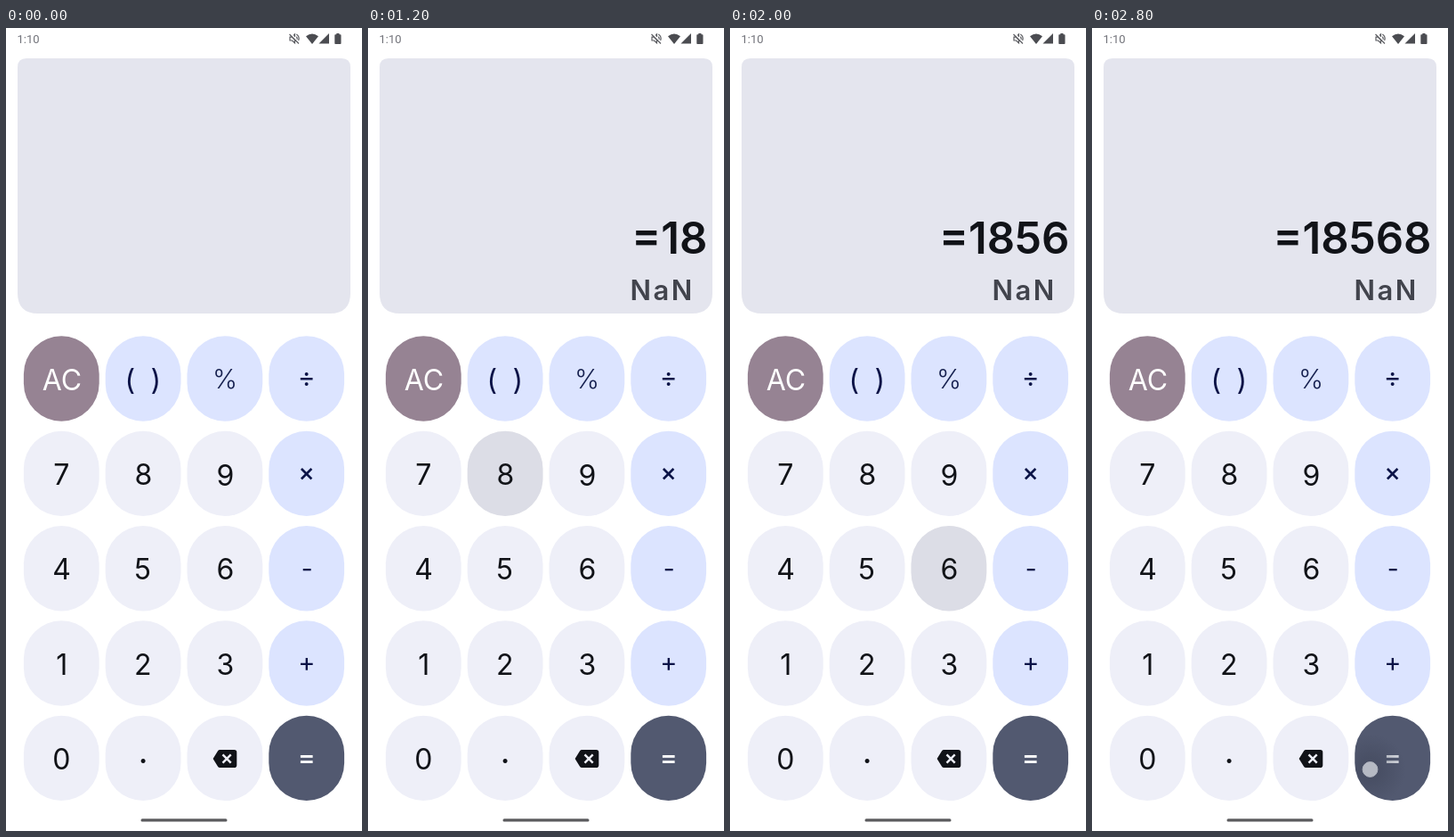
An HTML page for the animation above (3 s loop, 400 by 900 pixels).

```html
<!DOCTYPE html>
<html lang="en">
<head>
<meta charset="utf-8">
<title>Calculator</title>
<style>
  html, body { margin: 0; width: 100%; height: 100%; overflow: hidden; background: #fff; }
  svg { display: block; width: 400px; height: 900px; }
  text { font-family: Inter, sans-serif; white-space: pre; }
  .clock { font: 400 13px Roboto, sans-serif; fill: #717279; }
  .icons { fill: #4b4c51; }
</style>
</head>
<body>
<svg viewBox="0 0 400 900">
  <defs>
    <radialGradient id="glow">
      <stop offset="0" stop-color="#343a4c" stop-opacity=".45"/>
      <stop offset="1" stop-color="#343a4c" stop-opacity="0"/>
    </radialGradient>
    <clipPath id="equalsClip"><rect x="295.3" y="770.7" width="84.8" height="95.4" rx="42.4"/></clipPath>
  </defs>

  <text class="clock" x="12.5" y="16.5">1:10</text>
  <g class="icons">
    <g fill="none" stroke="#5c5d62" stroke-width="1.2">
      <path d="M318.5 7l10.5 10.5M319 10.2h2.2l3.3 3.3v3.3l-3-2.8h-2.5zM323 8.4l1.5-1.4v2.9M326.2 9.8q1.3 1.2.9 3M326.3 7q3.9 2.2 2.4 7"/>
    </g>
    <path d="M337 9.2q7-5.6 14 0L344 18z"/>
    <path d="M363 6v11.5h-11.5z"/>
    <path d="M371.3 7.2V6h3.2v1.2h1.2q.8 0 .8.8v9.2q0 .8-.8.8h-5.6q-.8 0-.8-.8V8q0-.8.8-.8z"/>
  </g>

  <path fill="#e4e5ee" d="M23 34h354q10 0 10 10v253q0 23-23 23H36q-23 0-23-23V44q0-10 10-10z"/>
  <g id="keys"></g>

  <path fill="#111318" d="M240.2 809h16.3q2.8 0 2.8 2.8v14.4q0 2.8-2.8 2.8h-16.3q-1.2 0-2-1.1L232.6 819l5.6-8.9q.8-1.1 2-1.1z"/>
  <path stroke="#eeeff8" stroke-width="2.5" d="M243.5 814.4l9.2 9.2m0-9.2l-9.2 9.2"/>
  <rect x="151.5" y="886.3" width="97" height="3.2" rx="1.6" fill="#5b5b5e"/>

  <g id="readout"></g>
  <circle id="glowSpot" cx="312.5" cy="831" r="40" fill="url(#glow)" clip-path="url(#equalsClip)"/>
  <rect id="ripple" width="84.8" height="95.4" rx="42.4" fill="#111318" fill-opacity=".08"/>
  <circle id="touch" r="8.4"/>
</svg>

<script>
const $ = id => document.getElementById(id);
const pen = document.createElement('canvas').getContext('2d');

function add(parent, tag, attrs) {
  const el = document.createElementNS('http://www.w3.org/2000/svg', tag);
  for (const name in attrs) el.setAttribute(name, attrs[name]);
  return parent.appendChild(el);
}

// Places a label by its inked box: centred on (x, y), or ending at x.
function label(parent, text, x, y, size, weight, fill, { end = false, spacing = 0 } = {}) {
  pen.font = `${weight} ${size}px Inter, sans-serif`;
  pen.letterSpacing = spacing + 'px';
  const box = pen.measureText(text);
  const left = box.actualBoundingBoxLeft, right = box.actualBoundingBoxRight;
  const el = add(parent, 'text', {
    x: end ? x - right : x + (left - right) / 2,
    y: y + (box.actualBoundingBoxAscent - box.actualBoundingBoxDescent) / 2,
    'font-size': size, 'font-weight': weight, 'letter-spacing': spacing, fill
  });
  el.textContent = text;
  return el;
}

const rows = [
  ['AC', '()', '%', '÷'],
  ['7', '8', '9', '×'],
  ['4', '5', '6', '-'],
  ['1', '2', '3', '+'],
  ['0', '.', '', '=']
];
const navy = '#0b1347';
const styles = {
  'AC': { back: '#968393', fill: '#fff' },
  '%': { size: 30, weight: 300, fill: '#16204f' },
  '÷': { size: 30 },
  '×': { size: 28, weight: 500 },
  '-': { size: 28, dy: .7 },
  '+': { size: 29 },
  '=': { size: 30, weight: 500, back: '#525970', fill: '#fff' },
  '.': { weight: 600, dy: 2.5 }
};
const spots = {};
const labels = {};

rows.forEach((row, r) => row.forEach((key, c) => {
  const x = 19.9 + 91.8 * c, y = 345.3 + 106.35 * r;
  const operator = r === 0 || c === 3;
  const { size = 32, weight = 400, dy = 0, fill = operator ? navy : '#111318',
          back = operator ? '#dce4ff' : '#eeeff8' } = styles[key] || {};
  const cx = x + 42.4, cy = y + 48.4 + dy;
  spots[key] = { x, y };
  add($('keys'), 'rect', { x, y, width: 84.8, height: 95.4, rx: 42.4, fill: back });
  if (key === '()') {
    label($('keys'), '(', cx - 13.5, cy + 1.8, 32, 400, fill);
    label($('keys'), ')', cx + 13.5, cy + 1.8, 32, 400, fill);
  } else if (key) {
    labels[key] = label($('keys'), key, cx, cy, size, weight, fill);
  }
}));

const full = '=18568';
const entries = [...full].map((_, i) =>
  label($('readout'), full.slice(0, i + 1), i < 2 ? 376.5 : 379, 235.2, 49, 600, '#111318', { end: true }));
const result = label($('readout'), 'NaN', 329.7, 293.7, 31, 600, '#42444d', { spacing: 2.5 });

const STEP = 200, STEPS = 15;
const typedAt = [1, 4, 6, 8, 10, 12];
const pressed = { 1: '=', 3: '1', 6: '8', 8: '5', 10: '6', 12: '8' };
const light = { fill: '#d9dee1', stroke: '#c3cad0' };
const touches = {
  3: { cx: 62, cy: 719, ...light },
  5: { cx: 160, cy: 503.5, ...light },
  7: { cx: 151.5, cy: 588, ...light },
  14: { cx: 312.5, cy: 831, fill: '#b6bac4', stroke: '#b0b4bf' }
};

const show = (el, on) => el.setAttribute('visibility', on ? 'visible' : 'hidden');

function render(step) {
  const count = typedAt.filter(at => at <= step).length;
  entries.forEach((el, i) => show(el, i === count - 1));
  show(result, count > 1);

  const spot = spots[pressed[step]];
  show($('ripple'), spot);
  for (const name in spot) $('ripple').setAttribute(name, spot[name]);

  const touch = touches[step];
  show($('touch'), touch);
  for (const name in touch) $('touch').setAttribute(name, touch[name]);

  const holding = step === STEPS - 1;
  show($('glowSpot'), holding);
  labels['='].setAttribute('fill', holding ? '#dadde3' : '#fff');
}

const start = performance.now();
let shown = -1;
function tick() {
  const step = Math.floor((performance.now() - start) / STEP) % STEPS;
  if (step !== shown) render(shown = step);
  requestAnimationFrame(tick);
}
tick();
</script>
</body>
</html>
```
